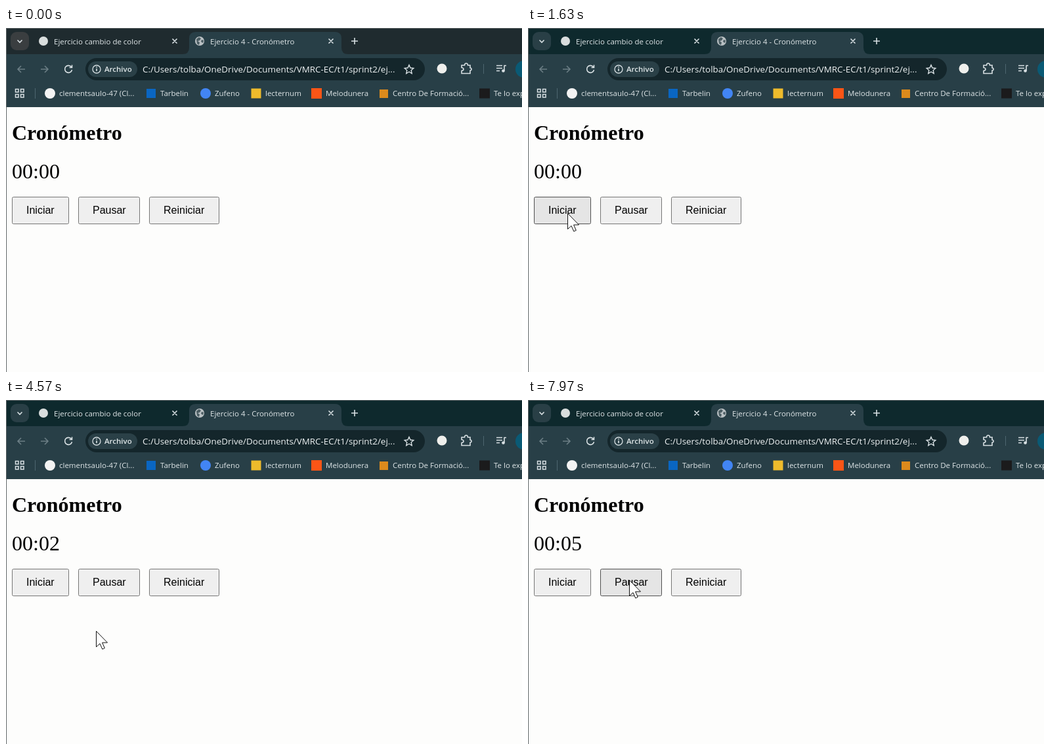
An HTML page that plays this animation: 786 px wide and 526 px high, repeating every 8 s.

```html
<!DOCTYPE html>
<html lang="es">
<head>
<meta charset="utf-8">
<title>Cronómetro</title>
<style>
  html, body { margin: 0; width: 100%; height: 100%; overflow: hidden; background: #fdfdfc; }
  svg { display: block; width: 100vw; height: 100vh; }
  text { white-space: pre; }
  .ui { font: 11.5px "Open Sans", "Noto Sans", sans-serif; fill: #dfe6e8; }
  .ui .url { font-size: 13.4px; fill: #eef2f3; }
  .ui .chip { font-weight: 600; }
  .line { fill: none; stroke: #d8e0e3; stroke-width: 1.6; }
  .dim { stroke: #6b7e85; }
  .split { stroke: #4d666f; }
  .bar { fill: #283f47; }
  .page { font-family: "Liberation Serif", "Times New Roman", serif; font-size: 32px; fill: #000; }
  .buttons { font: 16px "Liberation Sans", Arial, sans-serif; }
  .buttons rect { fill: #efefef; stroke: #767676; }
  .buttons .hover rect { fill: #e5e5e5; stroke: #4f4f4f; }
  .buttons .pressed rect { fill: #f5f5f5; stroke: #8d8d8d; }
  #strip { fill: #1f2b2f; }
  #menu { fill: #3a3e40; }
  .focused #strip { fill: #0e292d; }
  .focused #menu { fill: #293f46; }
</style>
</head>
<body>
<svg id="stage" viewBox="0 0 786 526" preserveAspectRatio="none">
  <rect width="786" height="526" fill="#fdfdfc"/>

  <!-- tab strip -->
  <rect id="strip" width="786" height="41"/>
  <rect id="menu" x="7" y="6" width="28" height="28" rx="9"/>
  <path class="line" d="M17.5 18.5l3.5 3.5 3.5-3.5"/>
  <path class="bar" d="M269 40q10 0 10-10V16q0-10 10-10H501q10 0 10 10V30q0 10 10 10z"/>
  <circle cx="57" cy="20" r="7" fill="#d9dddd"/>
  <circle cx="295" cy="20" r="7" fill="#b9c0c3"/>
  <path d="M290 17l4-3 3 2-2 3-3 1 3 2-1 4-3-2zM298 18l3 1-1 4-3-2z" fill="#4a5c62"/>
  <path class="line" d="M253.5 16.5l7 7m0-7l-7 7M491.5 16.5l7 7m0-7l-7 7M531 15v10m-5-5h10"/>

  <!-- toolbar and bookmarks -->
  <rect class="bar" y="40" width="786" height="81"/>
  <rect x="121" y="46" width="517" height="34" rx="17" fill="#14262b"/>
  <rect x="125" y="51" width="75" height="24" rx="12" fill="#2a4047"/>
  <path class="line dim" d="M29 63H18m5-5l-5 5 5 5M53 63h11m-5-5l5 5-5 5"/>
  <path class="line" d="M99.5 59.5A5.5 5.5 0 1 0 100.5 64M100.5 56.5v4h-4"/>
  <circle class="line" cx="138" cy="63" r="6" style="stroke-width:1.3"/>
  <path class="line" d="M138 62v4m0-7v1.5"/>
  <path class="line" style="stroke-width:1.4" d="M614 56.5l2 4.5 4.8.5-3.6 3.2 1 4.8-4.2-2.5-4.2 2.5 1-4.8-3.6-3.2 4.8-.5z"/>
  <circle cx="664" cy="62" r="7.5" fill="#efefec"/>
  <path class="line" d="M694 57h4.5q0-3 2.5-3t2.5 3h3.5v4q2 0 2 2t-2 2v4.5h-13v-4q3-.5 3-2.5t-3-2.5z"/>
  <path class="split" d="M727.5 55v15M44.5 92v16"/>
  <path class="line" d="M747 57.5h9m-9 4h9m-9 4h5m7 0v-8h3"/>
  <circle cx="757.5" cy="65.5" r="2.3" fill="#d8e0e3"/>
  <circle cx="789" cy="63" r="13" fill="#0a5a75"/>
  <path class="line" style="stroke-width:1.5" d="M14.5 93.5h4.5v4.5h-4.5zm8 0h4.5v4.5h-4.5zm0 8h4.5v4.5h-4.5zm-8 0h4.5v4.5h-4.5z"/>
  <circle cx="67" cy="100" r="8" fill="#f3f3f3"/>
  <rect x="214" y="93" width="14" height="14" fill="#0a66c2"/>
  <circle cx="304" cy="100" r="8" fill="#4285f4"/>
  <rect x="373.5" y="92.5" width="15" height="15" fill="#eebb2c"/>
  <rect x="465" y="92" width="16" height="16" fill="#fb5516"/>
  <rect x="569" y="94" width="13" height="13" fill="#dc8a1c"/>
  <rect x="721" y="92.5" width="16" height="15" fill="#1b1b1c"/>
  <g class="ui">
    <text x="73" y="25">Ejercicio cambio de color</text>
    <text x="311" y="25">Ejercicio 4 - Cronómetro</text>
    <text class="chip" x="150" y="67">Archivo</text>
    <text class="url" x="208" y="68">C:/Users/tolba/OneDrive/Documents/VMRC-EC/t1/sprint2/ej...</text>
    <text x="81" y="104">clementsaulo-47 (Cl...</text>
    <text x="235" y="104">Tarbelin</text>
    <text x="318" y="104">Zufeno</text>
    <text x="395" y="104">lecternum</text>
    <text x="487" y="104">Melodunera</text>
    <text x="589" y="104">Centro De Formació...</text>
    <text x="743" y="104">Te lo exp</text>
  </g>
  <path d="M0 .5H786M.5 0V526" stroke="#62686a"/>

  <!-- page -->
  <g class="page">
    <text x="9" y="171" font-weight="bold">Cronómetro</text>
    <text id="clock" x="9" y="230">00:00</text>
  </g>
  <g class="buttons">
    <g><rect x="9.5" y="258.5" width="86" height="41" rx="2"/><text x="31" y="284">Iniciar</text></g>
    <g><rect x="110.5" y="258.5" width="93" height="41" rx="2"/><text x="132" y="284">Pausar</text></g>
    <g><rect x="218.5" y="258.5" width="106" height="41" rx="2"/><text x="240" y="284">Reiniciar</text></g>
  </g>
  <path id="cursor" d="M.5 .5V24.5L6 19.5 9.8 28 13.3 26.4 9.6 18H17.5z" fill="#fff" stroke="#111"/>
</svg>

<script>
const LOOP = 8000;
const FOCUS = 1200;
const PRESS = 2100;
const START = 2200;

// time, x, y of the pointer tip
const PATH = [
  [220, 790, 262], [520, 63, 282], [1000, 63, 282], [1250, 60, 284],
  [1450, 60, 283], [2900, 60, 283], [3000, 60, 285], [3530, 60, 285],
  [3880, 137, 356], [3980, 137, 353], [6760, 137, 353], [6880, 137, 356],
  [7350, 154, 275]
];

const byId = id => document.getElementById(id);
const stage = byId('stage'), clock = byId('clock'), cursor = byId('cursor');
const buttons = [...document.querySelectorAll('.buttons g')].map(node => {
  const { x, y, width, height } = node.querySelector('rect');
  return { node, box: [x, y, width, height].map(side => side.baseVal.value) };
});

function pointerAt(t) {
  const next = PATH.findIndex(step => step[0] > t);
  if (next === 0) return [-100, -100];
  if (next < 0) return PATH[PATH.length - 1].slice(1);
  const [t0, x0, y0] = PATH[next - 1];
  const [t1, x1, y1] = PATH[next];
  const p = (t - t0) / (t1 - t0);
  const ease = p * p * (3 - 2 * p);
  return [Math.round(x0 + (x1 - x0) * ease), Math.round(y0 + (y1 - y0) * ease)];
}

function draw(t) {
  const [px, py] = pointerAt(t);
  cursor.setAttribute('transform', `translate(${px} ${py})`);
  stage.classList.toggle('focused', t >= FOCUS);
  const pressed = t >= PRESS && t < START;
  for (const { node, box: [x, y, w, h] } of buttons) {
    const over = px >= x && px <= x + w && py >= y && py <= y + h;
    node.classList.toggle('hover', over);
    node.classList.toggle('pressed', over && pressed);
  }
  const seconds = Math.max(0, Math.floor((t - START) / 1000));
  clock.textContent = '00:' + String(seconds).padStart(2, '0');
}

const begin = performance.now();
function frame() {
  draw((performance.now() - begin) % LOOP);
  requestAnimationFrame(frame);
}
frame();
</script>
</body>
</html>
```
